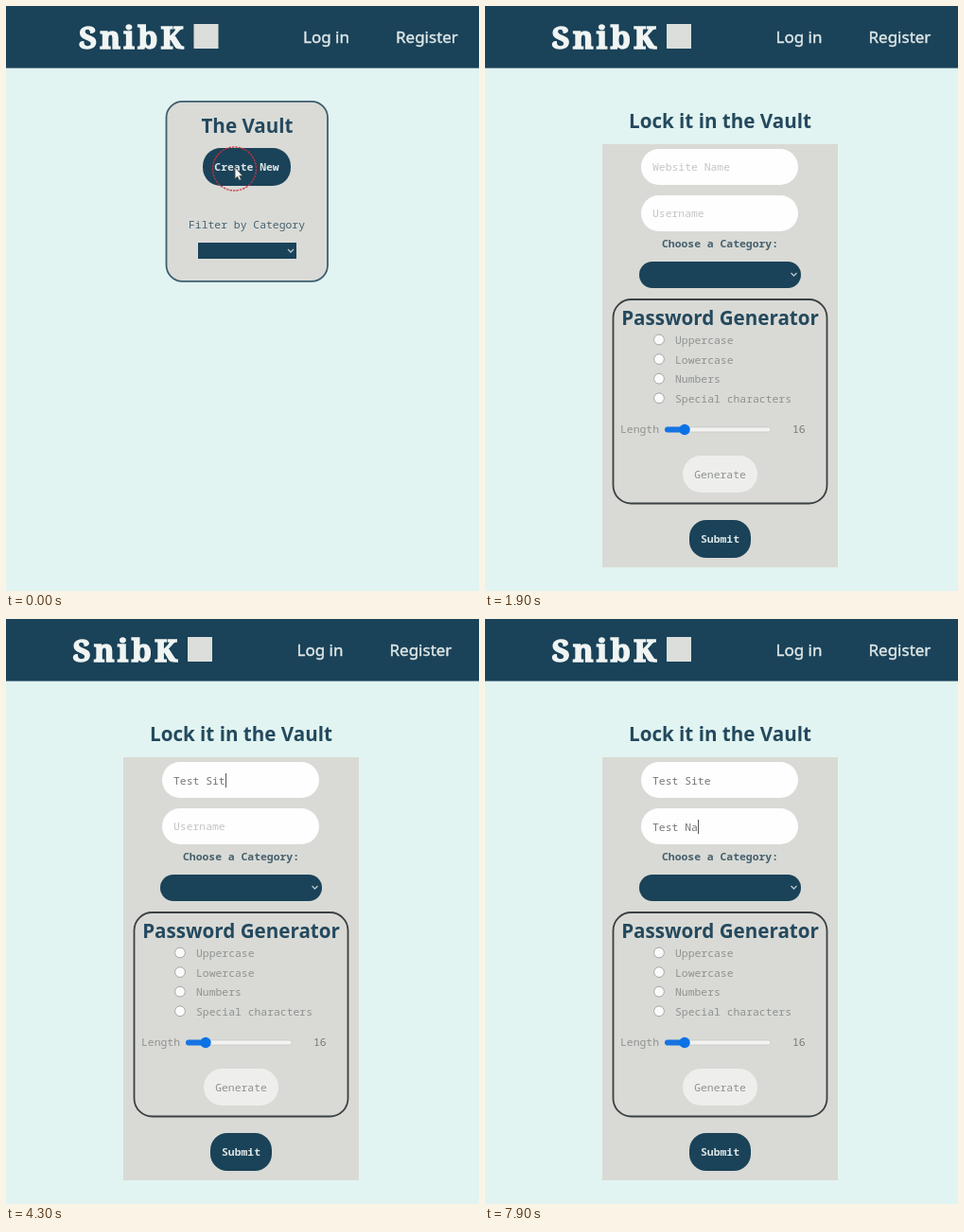
Recreate the animation shown at these times as an HTML page. Size 500 px wide and 618 px high, loop 8 s.

```html
<!DOCTYPE html>
<html lang="en">
<head>
<meta charset="utf-8">
<title>Password vault</title>
<style>
  :root { --navy: #1a4258; --panel: #d9dad5; --loop: 8s step-end infinite; }
  html, body { margin: 0; width: 100%; height: 100%; overflow: hidden; background: #e1f4f1; }
  svg { position: absolute; left: 0; top: 0; width: 500px; height: 618px; }
  .mono, .typed { font: 11.4px "Noto Sans Mono", "DejaVu Sans Mono", monospace; }
  .mono { fill: #8e9290; }
  .bold { font-weight: 700; }
  .mid { text-anchor: middle; }
  .navy { fill: var(--navy); }
  .light { fill: #dde5e5; }
  .dark { fill: #45606e; }
  .head { font: 700 20.6px "Noto Sans", "Open Sans", sans-serif; fill: #24495e; text-anchor: middle; }
  .nav { font: 17px "Noto Sans", "Open Sans", sans-serif; fill: #dfe8e8; stroke: #dfe8e8; stroke-width: .4; }
  .brand {
    font: 900 33px "Noto Serif", serif; letter-spacing: 3px;
    fill: #f0f5f3; stroke: #f0f5f3; stroke-width: 1.4;
  }
  .hint { fill: #c3c5c4; }
  .chevron { fill: none; stroke: #b9c7cb; stroke-width: 1.3; }

  #bar { animation: shift var(--loop); }
  #vault { animation: vault var(--loop); }
  #form { animation: form var(--loop); }
  #ring { animation: ring var(--loop); }
  #pointer { animation: pointer var(--loop); }
  #siteHint { animation: siteHint var(--loop); }
  #nameHint { animation: nameHint var(--loop); }

  /* Typed text is revealed one character at a time; its right border is the caret. */
  .typed {
    position: absolute; left: 177px; height: 15px; line-height: 15px;
    color: #747775; white-space: pre; overflow: hidden; border-right: 1.5px solid transparent;
  }
  #site { top: 163px; animation: site var(--loop), siteCaret var(--loop); }
  #name { top: 212px; animation: name var(--loop), nameCaret var(--loop); }

  @keyframes shift { 0% { transform: none } 8.7%, 100% { transform: translateX(-6.5px) } }
  @keyframes vault { 0% { visibility: visible } 8.7%, 100% { visibility: hidden } }
  @keyframes form { 0% { visibility: hidden } 8.7%, 100% { visibility: visible } }
  @keyframes ring {
    0% { opacity: .85 } 1.25% { opacity: .68 } 2.5% { opacity: .5 }
    3.75% { opacity: .33 } 5% { opacity: .16 } 6.2%, 100% { opacity: 0 }
  }
  @keyframes pointer { 0% { opacity: 1 } 20%, 100% { opacity: 0 } }
  @keyframes siteHint { 0% { opacity: 1 } 32.5%, 100% { opacity: 0 } }
  @keyframes nameHint { 0% { opacity: 1 } 81.25%, 100% { opacity: 0 } }
  @keyframes site {
    0% { width: 0 } 32.5% { width: 1ch } 35% { width: 2ch } 37.5% { width: 3ch }
    40% { width: 4ch } 42.5% { width: 5ch } 46.25% { width: 6ch } 50% { width: 7ch }
    53.75% { width: 8ch } 57.5%, 100% { width: 9ch }
  }
  @keyframes siteCaret {
    0%, 23.6%, 63.7%, 100% { border-color: transparent }
    17.5%, 30% { border-color: #555 }
  }
  @keyframes name {
    0% { width: 0 } 81.25% { width: 1ch } 85% { width: 2ch } 87.5% { width: 3ch }
    90% { width: 4ch } 92.5% { width: 5ch } 95.6% { width: 6ch } 98.7%, 100% { width: 7ch }
  }
  @keyframes nameCaret {
    0%, 70% { border-color: transparent }
    63.7%, 76.25%, 100% { border-color: #555 }
  }
</style>
</head>
<body>
<svg viewBox="0 0 500 618">
  <rect class="navy" width="500" height="65.6"/>
  <g id="bar">
    <text class="brand" x="77" y="45">SnibK</text>
    <rect x="198.5" y="19" width="26" height="26" fill="#dbdeda"/>
    <text class="nav" x="314" y="38.5">Log in</text>
    <text class="nav" x="412" y="38.5">Register</text>
  </g>

  <g id="vault">
    <rect x="169.5" y="100.8" width="170.500" height="190" rx="17" fill="#dadbd7" stroke="#3d5e70" stroke-width="1.8"/>
    <text class="head" x="255" y="134">The Vault</text>
    <rect class="navy" x="208" y="150" width="93" height="40" rx="19"/>
    <text class="mono bold light mid" x="254.500" y="174">Create New</text>
    <text class="mono dark mid" x="254.500" y="235">Filter by Category</text>
    <rect class="navy" x="203" y="250" width="104" height="17"/>
    <path class="chevron" d="M298 257l3 3 3-3"/>
  </g>

  <g id="form">
    <text class="head" x="248.500" y="129">Lock it in the Vault</text>
    <rect x="124" y="146" width="249" height="447" fill="#d9dad5"/>
    <rect x="165" y="151" width="166" height="38" rx="19" fill="#fefefe"/>
    <rect x="165" y="200" width="166" height="38" rx="19" fill="#fefefe"/>
    <g id="siteHint"><text class="mono hint" x="177" y="174">Website Name</text></g>
    <g id="nameHint"><text class="mono hint" x="177" y="223">Username</text></g>
    <text class="mono bold dark mid" x="248.500" y="255">Choose a Category:</text>
    <rect class="navy" x="163" y="270" width="171" height="28" rx="14"/>
    <path class="chevron" d="M323.500 282l3 3 3-3"/>

    <rect x="135.500" y="310" width="226" height="215.500" rx="19" fill="none" stroke="#3b4042" stroke-width="1.8"/>
    <text class="head" x="248.500" y="336.500">Password Generator</text>
    <g id="options"></g>
    <text class="mono" x="143" y="451">Length</text>
    <rect x="190" y="445" width="112" height="5" rx="2.500" fill="#f3f3f1" stroke="#c6c8c4" stroke-width=".8"/>
    <rect x="190" y="444.500" width="22" height="6" rx="3" fill="#1674e2"/>
    <circle cx="211" cy="447.500" r="5.700" fill="#0b72e6"/>
    <text class="mono" x="325" y="451" style="fill:#747875">16</text>
    <rect x="209" y="475" width="79" height="39" rx="19.500" fill="#eeefed"/>
    <text class="mono mid" x="248.500" y="499">Generate</text>
    <rect class="navy" x="216" y="543" width="65" height="40" rx="18"/>
    <text class="mono bold light mid" x="248.500" y="567">Submit</text>
  </g>

  <circle id="ring" cx="241.500" cy="172" r="23" fill="none" stroke="#c8323f" stroke-width="1.500" stroke-dasharray="2.5 1"/>
  <path id="pointer" d="M242 170v12.500l2.700-2.300 1.900 4 2-.9-1.800-3.900h3.300z" fill="#f6f6f6" stroke="#454b50" stroke-width=".9"/>
</svg>
<div id="site" class="typed">Test Site</div>
<div id="name" class="typed">Test Na</div>
<script>
  const labels = ["Uppercase", "Lowercase", "Numbers", "Special characters"];
  document.getElementById("options").innerHTML = labels.map((label, i) => {
    const y = 352.5 + i * 20.6;
    return `<circle cx="184" cy="${y}" r="5.4" fill="#fafafa" stroke="#a5a8a5"/>
      <text class="mono" x="201" y="${y + 4.5}">${label}</text>`;
  }).join("");
</script>
</body>
</html>
```
